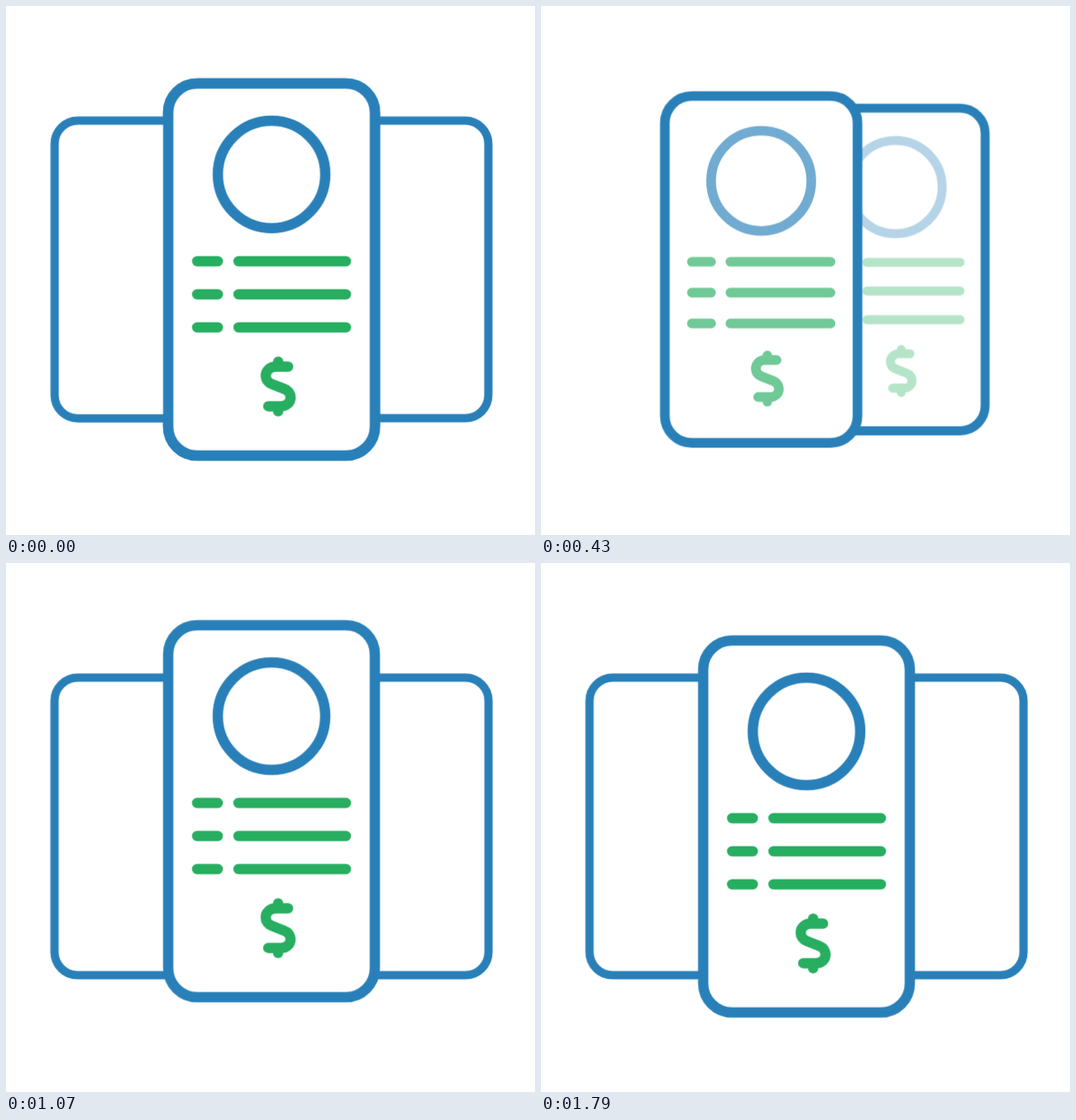
Write an HTML page without scripts that moves like this. It is 640 px wide and 640 px high and loops after 2.43 s.

```html
<!DOCTYPE html>
<html lang="en">
<head>
<meta charset="utf-8">
<title>Card carousel</title>
<style>
  html, body { margin: 0; width: 100%; height: 100%; overflow: hidden; background: #fff; }
  svg { display: block; width: 100%; height: 100%; }

  .frame { fill: #fff; stroke: #2980b9; stroke-width: 12.5; }
  .photo { fill: none; stroke: #2980b9; stroke-width: 12.5; }
  .lines { fill: none; stroke: #27ae60; stroke-width: 12.5; stroke-linecap: round; stroke-linejoin: round; }
  .back .frame { stroke-width: 10; vector-effect: non-scaling-stroke; }

  .back, .leave, .enter, .hide, .show, .top, .hop {
    animation: 2430ms -15ms infinite both;
    animation-timing-function: cubic-bezier(.667, 0, .333, 1);
  }
  .back  { animation-name: back; }
  .leave { animation-name: leave; }
  .enter { animation-name: enter; }
  .hide  { animation-name: hide; }
  .show  { animation-name: show; }
  .hop   { animation-name: hop; }
  .top   { animation-name: top; animation-timing-function: step-end; }

  /* right slot to left slot, turning over behind the others */
  @keyframes back {
    0% { transform: translateX(162.5px) scale(.8, .8); }
    31.48%, 100% { transform: translateX(-162.5px) scale(-.8, .8); }
  }
  @keyframes leave {
    0% { transform: translateX(0) scale(1); }
    32.92%, 100% { transform: translateX(162.5px) scale(.8); }
  }
  @keyframes enter {
    0% { transform: translateX(-162.5px) scale(.8); }
    32.92%, 100% { transform: translateX(0) scale(1); }
  }
  @keyframes hide {
    0% { opacity: 1; }
    32.92%, 100% { opacity: 0; }
  }
  @keyframes show {
    0% { opacity: 0; }
    32.92%, 100% { opacity: 1; }
  }
  /* stacking swap halfway through the turn */
  @keyframes top {
    0% { visibility: visible; }
    16.46%, 100% { visibility: hidden; }
  }
  @keyframes hop {
    0%, 41.77% { transform: translateY(0); }
    46.63%, 50% { transform: translateY(-24.4px); }
    73.66%, 100% { transform: translateY(0); }
  }
</style>
</head>
<body>
<svg viewBox="0 0 640 640">
  <defs>
    <rect id="frame" class="frame" x="-125" y="-225" width="250" height="450" rx="35"/>
    <g id="info">
      <circle class="photo" cy="-115" r="65"/>
      <path class="lines" d="M-90-10h25M-40-10H90M-90 30h25M-40 30H90M-90 70h25M-40 70H90"/>
      <path class="lines" d="M20 117.5H4.6C-1.8 117.5-7 122.4-7 128.4C-7 133-4.3 136.8 0 138.5L15.8 144.7C20.2 146.4 23 150.3 23 155C23 161 17.8 165.4 11.4 165.4H-4M8 111.5v6M8 165.5v6"/>
    </g>
    <g id="leaving" class="leave">
      <use href="#frame"/>
      <use href="#info" class="hide"/>
    </g>
  </defs>
  <g transform="translate(321.25 318.75)">
    <g class="back">
      <rect class="frame" x="-125" y="-225" width="250" height="450" rx="35"/>
    </g>
    <g class="leave">
      <use href="#frame"/>
      <use href="#info" class="hide"/>
    </g>
    <g class="hop">
      <g class="enter">
        <use href="#frame"/>
        <use href="#info" class="show"/>
      </g>
    </g>
    <g class="top">
      <g class="leave">
        <use href="#frame"/>
        <use href="#info" class="hide"/>
      </g>
    </g>
  </g>
</svg>
</body>
</html>
```
